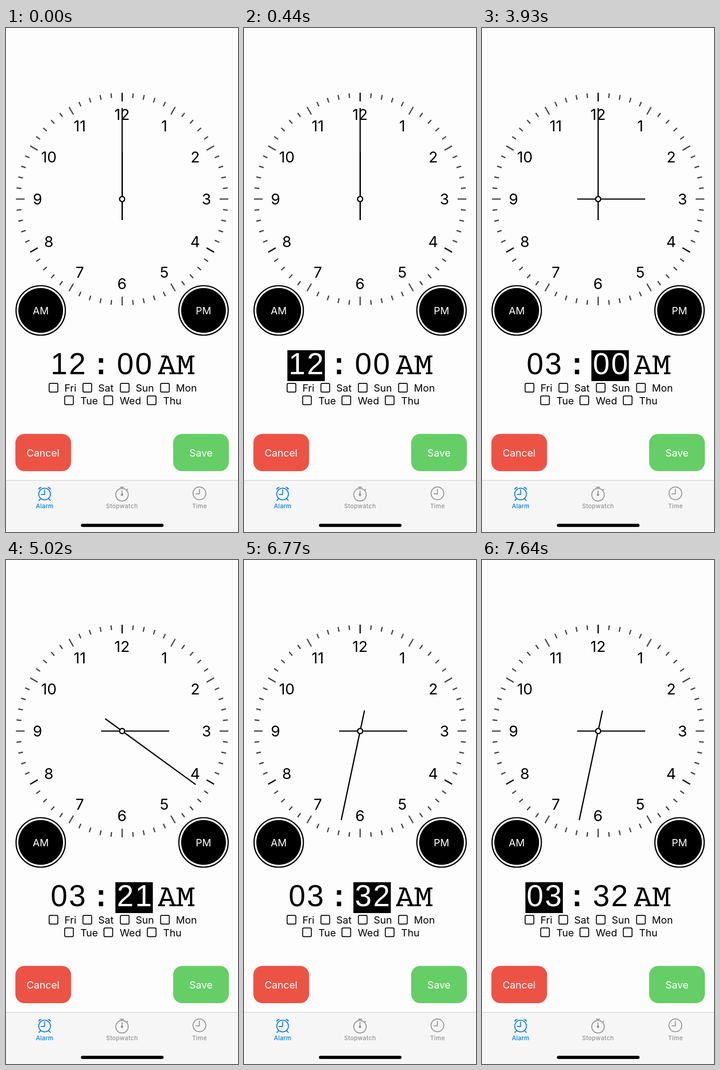
An HTML page that plays this animation: 508x1102 px, repeating every 8 s.

```html
<!DOCTYPE html>
<html lang="en">
<head>
<meta charset="utf-8">
<title>Alarm</title>
<style>
  html, body { margin: 0; width: 100%; height: 100%; overflow: hidden; background: #fdfdfd; }
  svg { display: block; width: 100%; height: 100%; font-family: Inter, sans-serif; }
  text { text-anchor: middle; }
  .line { fill: none; stroke: #000; stroke-width: 2.7; }
  .numerals { font-size: 33px; }
  .label { font-size: 22px; }
  .light { fill: #fff; }
  .days text { text-anchor: start; }
  .days rect { fill: none; stroke: #000; stroke-width: 2; }
  .digits { font: 66px "Liberation Sans", Arial, sans-serif; }
  .mono { font-family: "Liberation Mono", "Courier New", monospace; }
  .tab { fill: none; stroke: currentColor; stroke-width: 2; }
  .tab text { fill: currentColor; stroke: none; font-size: 13px; font-weight: 500; letter-spacing: .4px; }
  .tab .solid { fill: currentColor; stroke: none; }
</style>
</head>
<body>
<svg viewBox="0 0 508 1102">
  <rect width="508" height="1102" fill="#fdfdfd"/>
  <g id="ticks" stroke-width="2.7"></g>
  <g id="numerals" class="numerals"></g>
  <g class="line">
    <path id="hourHand" d="M254.3 420V271"/>
    <path id="minuteHand" d="M254.3 420V175"/>
    <circle cx="254.3" cy="374" r="5.6" fill="#fdfdfd"/>
  </g>

  <g id="periods" class="label"></g>

  <g class="digits">
    <g id="hours"><rect x="95" y="704.5" width="82" height="67.5"/>
      <text x="116" y="757"></text><text x="156" y="757"></text></g>
    <text x="208" y="757" class="mono" font-weight="700">:</text>
    <g id="minutes"><rect x="239.5" y="704.5" width="82" height="67.5"/>
      <text x="261" y="757"></text><text x="301" y="757"></text></g>
    <g class="mono" font-size="62">
      <text x="352" y="757">A</text><text x="393" y="757">M</text>
    </g>
    <path stroke="#000" stroke-width="4" d="M333 755h15M358 755h15M340 718h13M373.500 755h14M398.500 755h14M373.500 718h9M403.500 718h9"/>
  </g>

  <g id="days" class="days label"></g>

  <rect x="20.500" y="887.500" width="122" height="81.500" rx="20" fill="#ed5345"/>
  <text class="label light" x="81" y="937">Cancel</text>
  <rect x="366" y="887.500" width="122" height="81.500" rx="20" fill="#66ce66"/>
  <text class="label light" x="427" y="937">Save</text>

  <rect y="989" width="508" height="113" fill="#f6f6f6"/>
  <rect y="988.500" width="508" height="1.300" fill="#d0d0d0"/>
  <g class="tab" color="#087bee">
    <circle cx="84.500" cy="1019" r="12.800"/>
    <path d="M84.500 1010v10h-7.500M76 1029l-4 4M93 1029l4 4" stroke-linecap="round"/>
    <path class="solid" d="M71 1010q-1-7 8-6.500zM98 1010q1-7-8-6.500z"/>
    <text x="84.700" y="1050">Alarm</text>
  </g>
  <g class="tab" color="#939393">
    <circle cx="254" cy="1020.500" r="13.700"/>
    <path d="M249.500 1004h9M254 1004v4M264 1011l3-3M254 1021v-10"/>
    <circle class="solid" cx="254" cy="1020.500" r="2.600"/>
    <text x="254" y="1050">Stopwatch</text>
  </g>
  <g class="tab" color="#939393">
    <circle cx="423.500" cy="1017.500" r="14"/>
    <path d="M423.500 1008.500v10h-7.500" stroke-linecap="round"/>
    <text x="423.700" y="1050">Time</text>
  </g>
  <rect x="164" y="1084" width="181" height="7" rx="3.500"/>
</svg>
<script>
const LOOP = 8000;
const CX = 254.3, CY = 374;
const $ = id => document.getElementById(id);

function add(parent, name, attrs, content = '') {
  const node = document.createElementNS('http://www.w3.org/2000/svg', name);
  for (const key in attrs) node.setAttribute(key, attrs[key]);
  node.textContent = content;
  parent.append(node);
}

for (let i = 0; i < 60; i++) {
  add($('ticks'), 'path', {
    d: `M${CX} 141.500v${i % 5 ? 10.5 : 19}`,
    stroke: i % 20 ? '#444448' : '#000',
    transform: `rotate(${i * 6} ${CX} ${CY})`
  });
}
for (let n = 1; n <= 12; n++) {
  const angle = n * Math.PI / 6;
  add($('numerals'), 'text', { x: 254 + 185 * Math.sin(angle), y: 386 - 185 * Math.cos(angle) }, n);
}
for (const [name, x] of [['AM', 76], ['PM', 432.5]]) {
  add($('periods'), 'circle', { cx: x, cy: 617.5, r: 54, class: 'line' });
  add($('periods'), 'circle', { cx: x, cy: 617.5, r: 49 });
  add($('periods'), 'text', { x, y: 626, class: 'light' }, name);
}
const days = [
  ['Fri', 94.5, 128, 795], ['Sat', 168.5, 202, 795], ['Sun', 250.5, 284, 795], ['Mon', 338.5, 372, 795],
  ['Tue', 128.5, 163, 822.5], ['Wed', 214.5, 249, 822.5], ['Thu', 309.5, 344, 822.5]
];
for (const [name, boxX, x, y] of days) {
  add($('days'), 'rect', { x: boxX, y: y - 18, width: 19, height: 19, rx: 2.5 });
  add($('days'), 'text', { x, y }, name);
}

const states = [
  { at: 0, hour: 12, minute: 0 },
  { at: 220, hour: 12, minute: 0, active: 'hours' },
  { at: 1960, hour: 3, minute: 0, active: 'hours' },
  { at: 3930, hour: 3, minute: 0, active: 'minutes' },
  { at: 5020, hour: 3, minute: 21, active: 'minutes' },
  { at: 6110, hour: 3, minute: 27, active: 'minutes' },
  { at: 6770, hour: 3, minute: 32, active: 'minutes' },
  { at: 7640, hour: 3, minute: 32, active: 'hours' }
];

function showField(id, value, active) {
  const field = $(id);
  const digits = String(value).padStart(2, '0');
  field.querySelector('rect').style.visibility = active ? 'visible' : 'hidden';
  field.querySelectorAll('text').forEach((node, i) => {
    node.textContent = digits[i];
    node.style.fill = active ? '#fff' : '#000';
  });
}

function turn(id, degrees) {
  $(id).setAttribute('transform', `rotate(${degrees} ${CX} ${CY})`);
}

let shown;
function draw() {
  const time = performance.now() % LOOP;
  const state = states.findLast(s => s.at <= time);
  if (state !== shown) {
    shown = state;
    turn('hourHand', state.hour * 30);
    turn('minuteHand', state.minute * 6);
    showField('hours', state.hour, state.active === 'hours');
    showField('minutes', state.minute, state.active === 'minutes');
  }
  requestAnimationFrame(draw);
}
draw();
</script>
</body>
</html>
```
